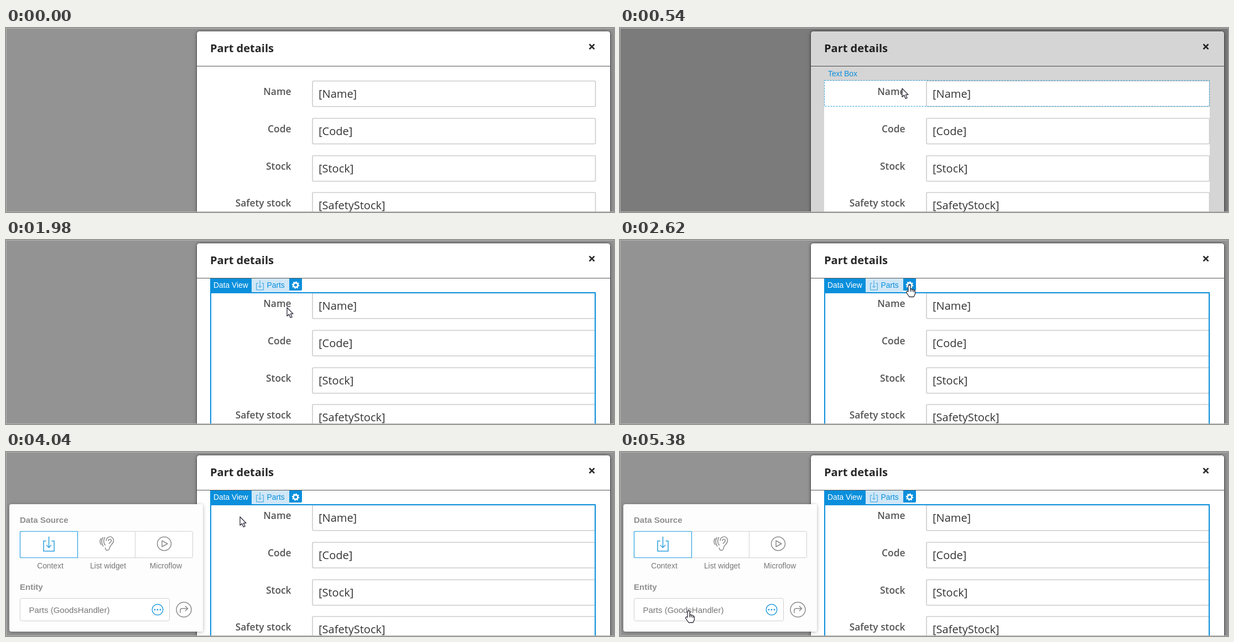
An HTML page for the animation above (5.82 s loop, 1099x335 px).

```html
<!DOCTYPE html>
<html lang="en">
<head>
<meta charset="utf-8">
<title>Part details</title>
<style>
  html, body { margin: 0; width: 100%; height: 100%; overflow: hidden; background: #949394; }
  svg { display: block; width: 1099px; height: 335px; }
  .title { font: 700 20px "Open Sans", sans-serif; fill: #262626; }
  .label { font: 600 17.35px "Open Sans", sans-serif; fill: #555; text-anchor: end; }
  .value { font: 400 20px "Open Sans", sans-serif; fill: #333; }
  .tag { font: 13.8px "Liberation Sans", Arial, sans-serif; }
  .head { font: 700 15px "Liberation Sans", Arial, sans-serif; fill: #8e8e8e; }
  .caption { font: 13.8px "Liberation Sans", Arial, sans-serif; fill: #777; text-anchor: middle; }
  .entity { font: 15px "Liberation Sans", Arial, sans-serif; fill: #777; }
  .blue { fill: #0a8fdc; }
  .line { fill: none; stroke: #8a8a8a; stroke-width: 1.5; }
  .blueline { fill: none; stroke: #2a9fe0; stroke-width: 1.5; }
  .box { fill: #fff; stroke: #d0d0d0; }
  .hover { fill: none; stroke: #2f9fda; stroke-dasharray: 3 2; }
  .pointer path { fill: #fff; stroke: #2b2b3a; stroke-width: 1.3; stroke-linejoin: round; }
</style>
</head>
<body>
<svg viewBox="0 0 1099 335">
  <defs>
    <filter id="soft" x="-10%" y="-10%" width="120%" height="120%">
      <feDropShadow dx="0" dy="1" stdDeviation="3" flood-opacity=".3"/>
    </filter>
    <g id="context">
      <path d="M-5 -5H-9.5V13.5H9.5V-5H5M0 -13V7M-4.5 2.5L0 7L4.5 2.5"/>
    </g>
  </defs>

  <rect width="1099" height="335" fill="#949394"/>
  <rect x="344.5" y="5.5" width="748" height="350" rx="5" fill="#fff" stroke="#4c4c50" filter="url(#soft)"/>
  <path d="M345 69.5H1092" stroke="#555"/>
  <text class="title" x="369" y="44">Part details</text>
  <path d="M1054.5 29.5L1063.5 38.5M1063.5 29.5L1054.5 38.5" stroke="#2b2b2b" stroke-width="2.6"/>

  <path id="dim" fill-rule="evenodd" d="M0 0H1099V335H0ZM369 96H1066V335H369Z"/>
  <g id="fields"></g>

  <g id="hoverText">
    <rect class="hover" x="369.5" y="95.5" width="696" height="47"/>
    <text class="tag blue" x="376" y="88">Text Box</text>
  </g>
  <g id="hoverView">
    <rect class="hover" x="369.5" y="95.5" width="696" height="260"/>
    <text class="tag blue" x="375.5" y="88">Data View</text>
  </g>
  <g id="selected">
    <rect x="370" y="96" width="695" height="260" fill="none" stroke="#0a8fdc" stroke-width="2"/>
    <rect class="blue" x="369" y="70" width="75" height="26"/>
    <text class="tag" x="375" y="87" fill="#fff">Data View</text>
    <rect x="444" y="70" width="68" height="25" fill="#d0e7f7"/>
    <use href="#context" class="blueline" transform="translate(459 82) scale(.66)"/>
    <text class="tag blue" x="471.5" y="87">Parts</text>
    <path class="blue" d="M512 70H535V90Q535 92 533 92H512Z"/>
    <g fill="none" stroke="#fff">
      <circle cx="523.5" cy="82" r="4" stroke-width="2.8"/>
      <circle cx="523.5" cy="82" r="5.8" stroke-width="2" pathLength="16" stroke-dasharray="1 1"/>
    </g>
  </g>

  <g id="panel">
    <rect x="6" y="95" width="350" height="232" rx="4" fill="#fdfdfd" filter="url(#soft)"/>
    <text class="head" x="25" y="129">Data Source</text>
    <rect class="box" x="25.5" y="144.5" width="312" height="48" rx="2"/>
    <path d="M233.5 145V192" stroke="#d0d0d0"/>
    <rect class="blueline" x="25.5" y="144.5" width="104" height="48" rx="1" style="stroke-width:1.2"/>
    <use href="#context" class="blueline" x="77.5" y="167"/>
    <path class="line" d="M181 162C181 152 194.5 152 194.5 161C194.5 168 188.5 168 187.5 174C186.5 181 179.5 180.5 179.5 174M185 162C185 158 190.5 158 190.5 162L186 167M179 155Q174 163 179.5 170M175.5 155Q170 163 176 172M172 157Q168 163 172 169"/>
    <circle class="line" cx="286" cy="167" r="12.5"/>
    <path class="line" d="M282 161.5V172.5L292 167Z" stroke-linejoin="round"/>
    <text class="caption" x="80" y="212">Context</text>
    <text class="caption" x="184.5" y="212">List widget</text>
    <text class="caption" x="289" y="212">Microflow</text>
    <text class="head" x="25" y="251">Entity</text>
    <rect class="box" x="25.5" y="266.5" width="270" height="41" rx="3"/>
    <text class="entity" x="41.5" y="293">Parts (GoodsHandler)</text>
    <circle class="blueline" cx="274" cy="287" r="9.8"/>
    <path d="M269 287H280" stroke="#2a9fe0" stroke-width="3" stroke-linecap="round" stroke-dasharray="0 5"/>
    <circle class="line" cx="321.5" cy="287" r="13.5"/>
    <path class="line" d="M315 293V288Q315 285 318 285H328M324 280.5L328.5 285L324 289.5"/>
  </g>

  <path d="M0 .5H1099M.5 0V335M0 334.5H1099" stroke="#b4b4b0" fill="none"/>
  <g id="pointer" class="pointer">
    <g id="arrow"><path d="M0 0V15.5L3.6 12.3L6.2 18.5L9 17.3L6.4 11.4H11Z"/></g>
    <g id="hand">
      <path d="M-2 12V1.5Q0 -1.5 2 1.5V8Q4 6 5 8.5Q7 7 8 9.5Q10.5 9 10.5 12V16L8 21.5H0L-5.5 13.5Q-5 10 -2 12Z"/>
      <path d="M2 8V12M5 9V12M8 10V13" fill="none"/>
    </g>
    <g id="grab">
      <path d="M-4 10L-7.5 4.5Q-7 2 -4 4L-5.5 -3Q-4.5 -6 -2.5 -3L-2 -5Q0 -8 1.5 -5L2 -4.5Q4 -7 5 -3.5Q8 -5 8.5 -1V5L5.5 12H-2Z"/>
      <path d="M-2.5 -3L-1.5 2M1.5 -5V2M5 -3.5L4.5 2" fill="none"/>
    </g>
  </g>
  <circle id="click" r="15" fill="#fff000" opacity=".62"/>
</svg>

<script>
const LOOP = 5820;
const $ = id => document.getElementById(id);

$('fields').innerHTML = ['Name', 'Code', 'Stock', 'Safety stock'].map((name, i) => {
  const y = Math.round(67.75 * i);
  const value = name === 'Safety stock' ? 'SafetyStock' : name;
  return `<text class="label" x="515.5" y="${122 + y}">${name}</text>
    <rect x="554" y="${96.5 + y}" width="511.5" height="46.5" rx="2" fill="#fff" stroke="#cbcbcb" stroke-width="1.6"/>
    <text class="value" x="565" y="${127 + y}">[${value}]</text>`;
}).join('');

const ticks = [0, 100, 260, 340, 440, 540, 660, 760, 860, 960, 1080, 1420, 1540, 1640, 1760, 1860, 1980,
  2080, 2200, 2300, 2520, 2620, 2740, 2840, 3610, 3730, 3830, 3930, 4050, 4160, 4260, 4380,
  4720, 4820, 4940, 5040, 5160, 5280, 5380];

// time, x, y of the pointer's hot spot
const path = [[0, 585, -19], [100, 577, 18], [260, 560, 58], [540, 510, 110], [760, 501, 140], [1080, 498, 152],
  [1760, 498, 152], [2300, 523, 82], [2840, 523, 82], [3610, 504, 79], [4160, 364, 146],
  [4380, 103, 170], [4820, 103, 170], [5280, 120, 266], [5380, 124, 289], [LOOP, 124, 289]];

const pointers = [[0, 'arrow'], [2300, 'hand'], [3610, 'grab'], [3730, 'arrow'], [4260, 'hand']];
const outlines = [[0, ''], [340, 'hoverText'], [760, 'hoverView'], [1540, 'selected']];
const dims = [[0, 0], [340, .08], [440, .165], [760, 0]];
const panels = [[0, 0], [2740, .6], [2840, 1]];
const clicks = [[0, false], [1420, true], [1540, false], [2520, true], [2620, false], [4720, true], [4820, false]];

const valueAt = (steps, t) => steps.findLast(step => step[0] <= t)[1];
const show = (id, on) => $(id).setAttribute('visibility', on ? 'visible' : 'hidden');

function pointAt(t) {
  const i = Math.max(1, path.findIndex(p => p[0] > t));
  const [a, b] = [path[i - 1], path[i]];
  const k = (t - a[0]) / (b[0] - a[0]);
  return [a[1] + (b[1] - a[1]) * k, a[2] + (b[2] - a[2]) * k];
}

function draw(t) {
  const [x, y] = pointAt(t).map(Math.round);
  $('pointer').setAttribute('transform', `translate(${x} ${y})`);
  $('click').setAttribute('transform', `translate(${x - 1} ${y})`);
  for (const id of ['arrow', 'hand', 'grab']) show(id, id === valueAt(pointers, t));
  for (const id of ['hoverText', 'hoverView', 'selected']) show(id, id === valueAt(outlines, t));
  show('click', valueAt(clicks, t));
  $('dim').setAttribute('opacity', valueAt(dims, t));
  $('panel').setAttribute('opacity', valueAt(panels, t));
}

const start = performance.now();
let shown = -1;
function frame() {
  const t = (performance.now() - start) % LOOP;
  const tick = ticks.findLast(time => time <= t);
  if (tick !== shown) draw(shown = tick);
  requestAnimationFrame(frame);
}
frame();
</script>
</body>
</html>
```
